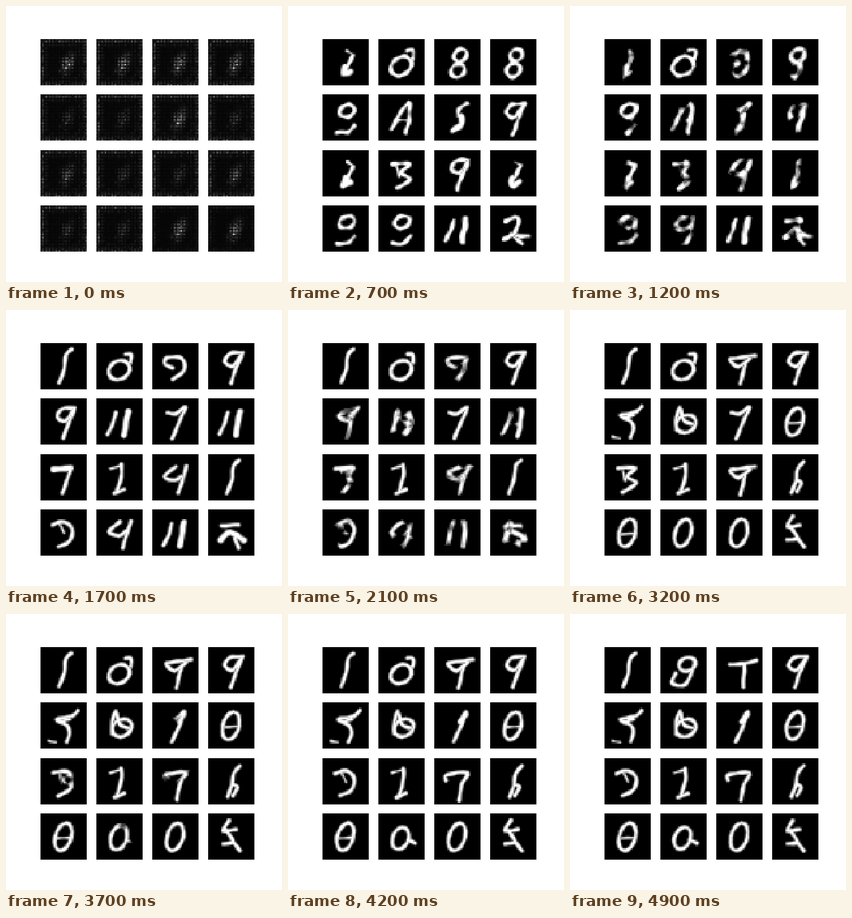
An HTML page with a canvas that plays this animation: 400 by 400 pixels, repeating every 5 s.

```html
<!DOCTYPE html>
<html lang="en">
<head>
<meta charset="utf-8">
<title>Generated digits</title>
<style>
html, body { margin: 0; width: 100%; height: 100%; overflow: hidden; background: #fff; }
canvas { display: block; }
</style>
</head>
<body>
<canvas id="stage" width="400" height="400"></canvas>
<script>
const N = 28, SIZE = 67, STEP = 100, STEPS = 50, SOFT = 3.2;
const stage = document.getElementById('stage').getContext('2d');
stage.imageSmoothingEnabled = false;
const tile = document.createElement('canvas');
tile.width = tile.height = N;
const tileCtx = tile.getContext('2d');
const image = tileCtx.createImageData(N, N);

const clamp = v => Math.max(0, Math.min(1, v));
const hash = (a, b, c) => {
  const s = Math.sin(a * 127.1 + b * 311.7 + c * 74.7) * 43758.5;
  return s - Math.floor(s);
};

// Smooth stroke through a few x, y points.
function stroke(radius, xy) {
  const n = xy.length / 2, pts = [];
  const at = (i, axis) => xy[2 * Math.max(0, Math.min(n - 1, i)) + axis];
  const spline = (i, t, axis) => {
    const a = at(i - 1, axis), b = at(i, axis), c = at(i + 1, axis), d = at(i + 2, axis);
    return b + t / 2 * (c - a + t * (2 * a - 5 * b + 4 * c - d + t * (3 * (b - c) + d - a)));
  };
  for (let i = 0; i < n - 1; i++) {
    for (let t = 0; t < 1; t += .25) pts.push([spline(i, t, 0), spline(i, t, 1)]);
  }
  pts.push([at(n, 0), at(n, 1)]);
  return { radius, pts };
}
const line = (...xy) => stroke(2.7, xy);
const thin = (...xy) => stroke(1.6, xy);
const fat = (...xy) => stroke(4.2, xy);

// Ellipse leaning to the right.
function ring(cx, cy, rx, ry) {
  const pts = [];
  for (let i = 0; i <= 16; i++) {
    const a = i * Math.PI / 8, dy = ry * Math.sin(a);
    pts.push([cx + rx * Math.cos(a) - dy / 5, cy + dy]);
  }
  return { radius: 2.7, pts };
}

const tall = ring(33, 34, 12, 20);
const glyphs = {
  seed: [stroke(7, [40, 18, 30, 50])],
  one: [line(45, 9, 37, 17, 34, 38, 27, 57)],
  spike: [fat(45, 17, 38, 28), line(46, 14, 39, 34, 28, 57)],
  zero: [tall],
  theta: [tall, thin(21, 36, 45, 35)],
  loop: [ring(33, 39, 15, 14), line(42, 16, 50, 17, 50, 28)],
  curl: [ring(39, 25, 12, 10), line(50, 24, 36, 54, 17, 52, 22, 38)],
  tailed: [ring(32, 36, 12, 16), line(43, 38, 53, 43)],
  arch: [line(24, 54, 21, 28, 34, 13, 45, 30, 44, 54)],
  eight: [ring(38, 23, 9, 9), ring(34, 45, 10, 10)],
  wide: [ring(37, 37, 14, 13), line(28, 13, 23, 28, 23, 46), line(30, 17, 34, 32, 46, 37)],
  nine: [line(50, 14, 32, 15, 24, 27, 36, 33, 49, 16, 39, 40, 33, 58)],
  flat: [line(56, 18, 34, 21, 20, 24, 32, 34, 49, 22), line(42, 29, 39, 42, 35, 59)],
  tee: [line(20, 25, 40, 24, 58, 19), line(41, 25, 39, 58)],
  seven: [line(17, 32, 18, 24, 48, 21, 40, 38, 36, 61)],
  hook: [line(22, 21, 34, 22, 48, 13, 39, 34, 29, 58)],
  yen: [fat(19, 22, 44, 20), line(45, 20, 38, 38, 32, 56)],
  five: [line(54, 12, 45, 20, 23, 25, 38, 33, 42, 44, 38, 57), line(30, 28, 42, 24), thin(12, 56, 22, 58)],
  slab: [line(48, 13, 36, 22, 34, 32), fat(38, 32, 40, 44, 28, 52)],
  six: [line(46, 11, 37, 22, 34, 40, 28, 56), line(35, 38, 42, 42, 36, 54)],
  three: [line(20, 20, 45, 20, 33, 32, 46, 42, 26, 55), thin(26, 21, 30, 38)],
  dee: [line(18, 22, 34, 18, 46, 28, 42, 46, 26, 54), thin(28, 22, 34, 34)],
  two: [thin(20, 21, 34, 17), line(36, 15, 36, 32, 30, 54), line(26, 57, 40, 51)],
  zee: [line(22, 23, 40, 18, 36, 40, 19, 49), line(30, 42, 46, 56), line(38, 44, 56, 45)],
  clump: [thin(36, 17, 44, 22), line(44, 23, 36, 40), fat(33, 40, 31, 51, 41, 46)],
  gap: [ring(35, 24, 11, 9), line(21, 55, 36, 55, 46, 45)],
  aye: [line(44, 12, 32, 25, 20, 50), line(45, 13, 45, 34, 40, 56), thin(26, 37, 44, 38)],
  pair: [line(28, 21, 24, 36, 16, 52), fat(46, 19, 40, 53)],
  open: [line(34, 18, 18, 32, 32, 38, 42, 32), line(50, 17, 38, 56)],
  gee: [line(29, 36, 18, 30, 22, 21, 43, 22, 46, 40, 30, 52)],
  cross: [line(19, 24, 44, 22), fat(18, 45, 32, 33, 52, 45), line(39, 43, 44, 56)],
  bolt: [line(30, 10, 22, 25, 40, 23), line(26, 24, 36, 41, 22, 44), line(37, 42, 46, 54)]
};

function segDist(px, py, [ax, ay], [bx, by]) {
  const dx = bx - ax, dy = by - ay;
  const t = clamp(((px - ax) * dx + (py - ay) * dy) / (dx * dx + dy * dy || 1));
  return Math.hypot(px - ax - t * dx, py - ay - t * dy);
}

// Signed depth inside a glyph for each tile pixel.
function depthField(strokes) {
  return Float32Array.from({ length: N * N }, (_, i) => {
    const x = (i % N + .5) * SIZE / N, y = (Math.floor(i / N) + .5) * SIZE / N;
    let best = -14;
    for (const { radius, pts } of strokes) {
      for (let k = 1; k < pts.length; k++) {
        best = Math.max(best, radius - segDist(x, y, pts[k - 1], pts[k]));
      }
    }
    return best;
  });
}
const fields = {};
for (const name in glyphs) fields[name] = depthField(glyphs[name]);

const poses = [];
const pose = (step, names) => poses.push({ step, names: names.trim().split(/\s+/) });
pose(0, 'seed '.repeat(16));
pose(7, `clump loop  eight eight  gap  aye  slab  nine
         clump three nine  clump  gap  gap  pair  zee`);
pose(17, `one  loop gee  nine  nine pair hook pair
          yen  two  open one   dee  open pair cross`);
pose(25, `one   loop flat nine  five  wide   hook aye
          three two  flat one   theta tailed arch wide`);
pose(32, `one   loop flat nine  five  wide hook theta
          three two  flat six   theta zero zero bolt`);
pose(42, `one loop flat  nine  five  wide   spike theta
          dee two  seven six   theta tailed zero  bolt`);
pose(49, `one curl tee   nine  five  wide   spike theta
          dee two  seven six   theta tailed zero  bolt`);

// Untrained output: a speckled lattice with a brighter slanted core.
const STRONG = 1, MEDIUM = .7, FAINT = .4;
const gainOf = cell => cell < 4 || [6, 14, 15].includes(cell) ? STRONG
  : [8, 11].includes(cell) ? MEDIUM : FAINT;
function speckle(x, y, cell) {
  const h = .6 * hash(x, y, 3) + .4 * hash(x, y, cell + 9);
  const lattice = (x % 2 ? 1 : .45) * (y % 2 ? 1 : .45);
  const rim = Math.min(x, y, N - 1 - x, N - 1 - y);
  const edge = (rim < 2 ? .36 : rim < 5 ? .1 : .03) * (cell > 13 ? .35 : 1);
  const u = (x - 16 + (y - 14) / 4) / 3.2, w = (y - 14.5) / 5.5;
  return .02 + lattice * h * (edge + gainOf(cell) * Math.exp(-u * u - w * w));
}

function drawCell(cell, step) {
  let k = 0;
  while (k < poses.length - 2 && poses[k + 1].step <= step) k++;
  const from = poses[k], to = poses[k + 1];
  const a = fields[from.names[cell]], b = fields[to.names[cell]];
  const t = (step - from.step) / (to.step - from.step);
  const sway = step < 17 ? 1.3 : .6;
  const grown = clamp(step / 3), raw = clamp(1 - step / 4);
  for (let i = 0; i < N * N; i++) {
    const x = i % N, y = Math.floor(i / N);
    const wave = Math.sin(x * .7 + step * 2.1 + cell) * Math.sin(y * .6 - step * 1.7 + cell * 2);
    const depth = a[i] * (1 - t) + b[i] * t + sway * wave;
    let v = clamp(depth / SOFT + .5) * grown;
    if (raw) v = Math.max(v * (1 - raw * .6 * hash(x, y, step)), speckle(x, y, cell) * raw);
    image.data.set([255 * v, 255 * v, 255 * v, 255], i * 4);
  }
  tileCtx.putImageData(image, 0, 0);
  const left = Math.round(50 + cell % 4 * 81), top = Math.round(48 + Math.floor(cell / 4) * 80.4);
  stage.drawImage(tile, left, top, SIZE, SIZE);
}

let shown = -1;
function render(ms) {
  const step = Math.floor(ms / STEP) % STEPS;
  if (step === shown) return;
  shown = step;
  for (let cell = 0; cell < 16; cell++) drawCell(cell, step);
}

stage.fillStyle = '#fff';
stage.fillRect(0, 0, 400, 400);
const start = performance.now();
function tick() {
  render(performance.now() - start);
  requestAnimationFrame(tick);
}
tick();
</script>
</body>
</html>
```
